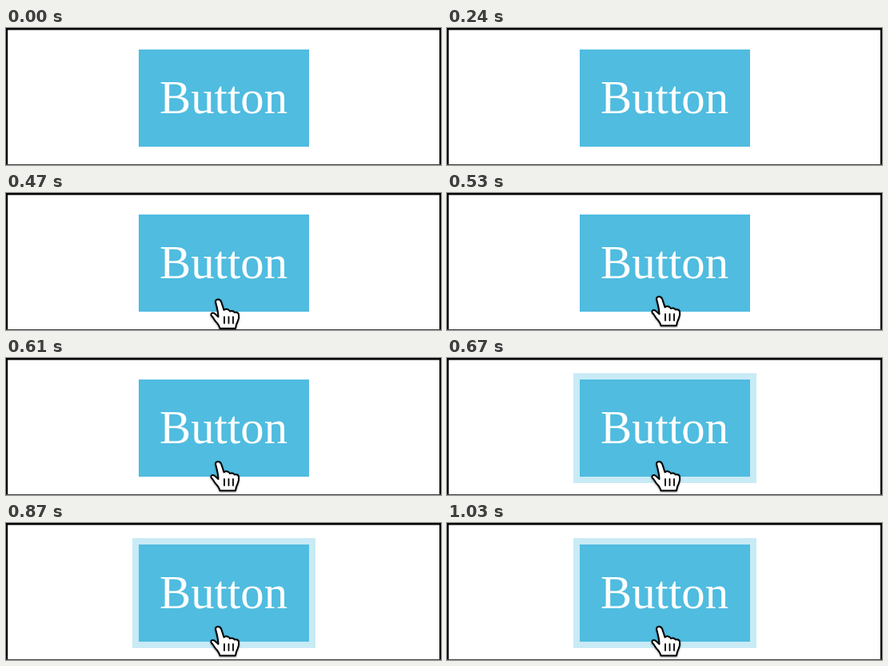
Animation, 544 px wide and 172 px high, one loop 1140 ms. Source, as an HTML page:

```html
<!DOCTYPE html>
<html lang="en">
<head>
<meta charset="utf-8">
<title>Button focus ring</title>
<style>
html, body { margin: 0; width: 100%; height: 100%; overflow: hidden; background: #fff; }
svg { display: block; width: 544px; height: 172px; }
text { font: 58.8px "Liberation Serif", "Times New Roman", serif; fill: #fff; }
.cursor { filter: drop-shadow(0 1.5px 1.2px rgba(0, 0, 0, .4)); }
</style>
</head>
<body>
<svg viewBox="0 0 544 172">
  <rect id="ring" x="158" y="19" width="229" height="138" fill="#c8ebf6"/>
  <rect x="166" y="27" width="213" height="122" fill="#4fbce0"/>
  <text x="192" y="107">Button</text>
  <path d="M0 0H544V172H542V2.5H2.2V172H0Z"/>
  <path d="M0 171H544V172H0Z" fill="#444"/>
  <g id="arrow" class="cursor">
    <path d="M269 151.5V186L277 178L282 190L288 187L283 176H294Z" stroke="#fff" stroke-width="3" paint-order="stroke"/>
  </g>
  <g id="hand" class="cursor" stroke="#000" stroke-width="2" stroke-linejoin="round" stroke-linecap="round">
    <path fill="#fff" d="M262.5 135Q261 130.5 265 130Q268 130 269.3 133.5L272.5 143.5Q275 141.5 278 143Q279.5 144 280 145Q283.5 143.5 286 146.5Q290 145.5 291 149Q291.8 153 289.8 157.5Q287.5 162 287 166.5H267.5Q266.5 162 261.5 157Q259 152.5 256.5 150Q256 146 260.5 147.5L265.5 152Q265.5 146 262.5 135Z"/>
    <path fill="none" stroke-width="1.8" d="M273 152V160M278.5 152V160M284 152V160"/>
  </g>
</svg>
<script>
const LOOP = 1140;
const [ring, arrow, hand] = ["ring", "arrow", "hand"].map(id => document.getElementById(id));
const show = (el, on) => el.setAttribute("visibility", on ? "visible" : "hidden");
const start = performance.now();

function draw(now) {
  const t = Math.max(0, now - start) % LOOP;
  show(arrow, t >= 400 && t < 470);
  show(hand, t >= 470);
  show(ring, t >= 670);
  hand.setAttribute("transform", `translate(0 ${t < 530 ? 3.5 : 0})`);
  requestAnimationFrame(draw);
}
draw(start);
</script>
</body>
</html>
```
